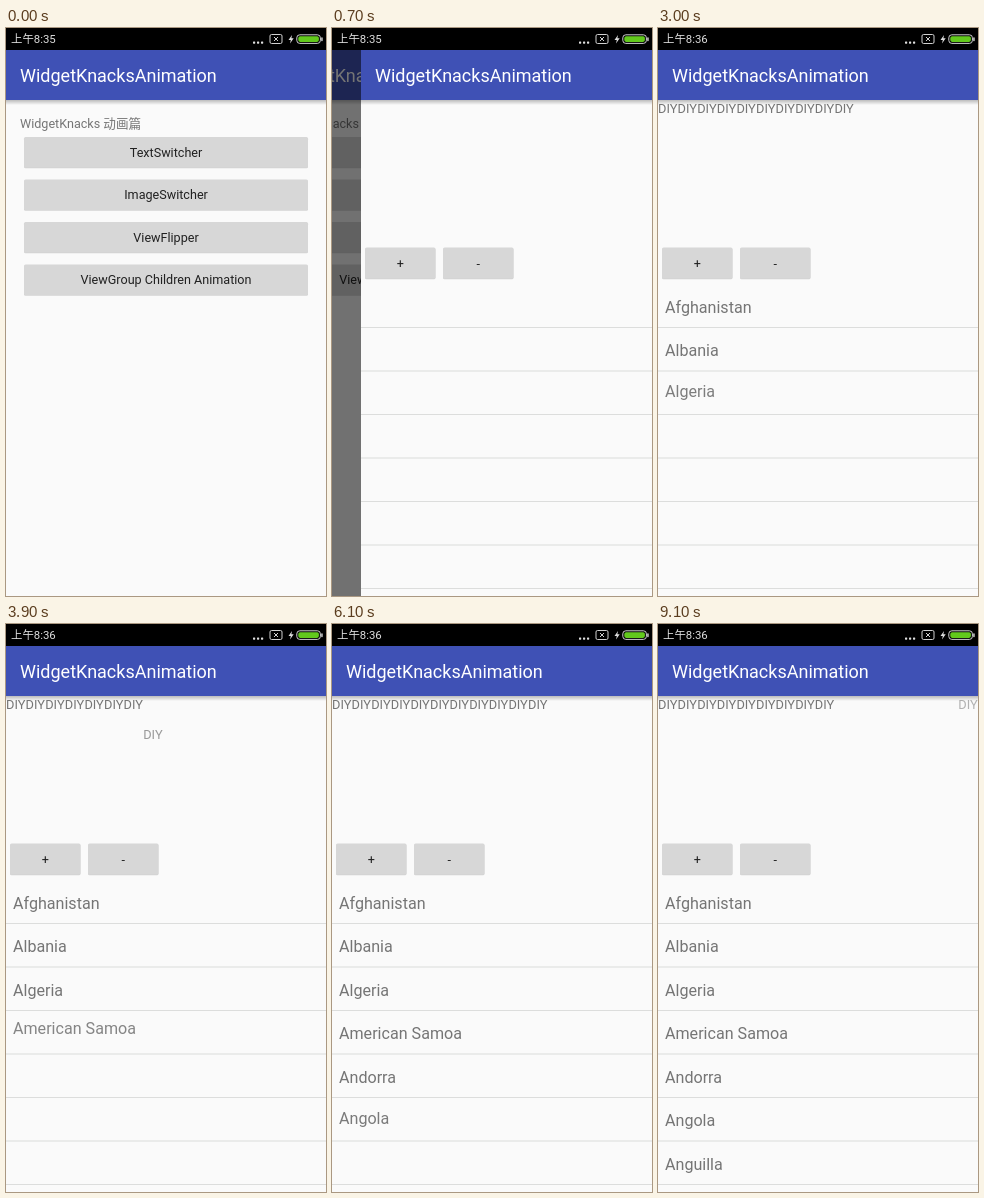
Write an HTML page with a canvas that moves like this. It is 320x568 px and loops after 9.2 s.

```html
<!DOCTYPE html>
<html lang="zh">
<head>
<meta charset="utf-8">
<title>Layout animation demo</title>
<style>
html, body { margin: 0; width: 100%; height: 100%; overflow: hidden; background: #fafafa; }
canvas { display: block; width: 320px; height: 568px; }
</style>
</head>
<body>
<canvas id="stage"></canvas>
<script>
const W = 320, H = 568, LOOP = 9200, STEP = 100;
const FONT = 'Roboto, "Noto Sans CJK SC", "Noto Sans CJK", sans-serif';
const NAME = 'WidgetKnacks';
const MENU = ['TextSwitcher', 'ImageSwitcher', 'ViewFlipper', 'ViewGroup Children Animation'];
const COUNTRIES = ['Afghanistan', 'Albania', 'Algeria', 'American Samoa',
  'Andorra', 'Angola', 'Anguilla', 'Antarctica'];
const ROW = 43.5, SLOT = 19.6;

const canvas = document.getElementById('stage');
const ctx = canvas.getContext('2d');
const dpr = window.devicePixelRatio || 1;
canvas.width = W * dpr;
canvas.height = H * dpr;

const ramp = (t, start, span) => Math.min(1, Math.max(0, (t - start) / span));
const easeOut = (p, power) => 1 - Math.pow(1 - p, power);

function box(x, y, w, h, color) {
  ctx.fillStyle = color;
  ctx.fillRect(x, y, w, h);
}

function round(x, y, w, h, r, color) {
  ctx.fillStyle = color;
  ctx.beginPath();
  ctx.roundRect(x, y, w, h, r);
  ctx.fill();
}

function text(str, x, y, size, color, align = 'left') {
  ctx.font = `${size}px ${FONT}`;
  ctx.textAlign = align;
  ctx.fillStyle = color;
  ctx.fillText(str, x, y);
}

function faded(alpha, draw) {
  ctx.save();
  ctx.globalAlpha = alpha;
  draw();
  ctx.restore();
}

function button(label, x, y, w, h) {
  round(x, y + 0.8, w, h, 1.5, 'rgba(0,0,0,.16)');
  round(x, y, w, h, 1.5, '#d7d7d7');
  text(label, x + w / 2, y + h / 2 + 4.5, 12.6, '#212121', 'center');
}

function pageBase() {
  box(0, 22, W, H - 22, '#fafafa');
  const shade = ctx.createLinearGradient(0, 72, 0, 77);
  shade.addColorStop(0, 'rgba(0,0,0,.25)');
  shade.addColorStop(1, 'rgba(0,0,0,0)');
  box(0, 72, W, 5, shade);
  box(0, 22, W, 50, '#3f51b5');
  text(NAME + 'Animation', 14, 53.8, 18, '#fff');
}

function menuPage() {
  pageBase();
  text(NAME + ' 动画篇', 14, 99.5, 12.6, '#757575');
  MENU.forEach((label, i) => button(label, 18, 109 + i * 42.5, 284, 30.5));
}

// Tags fly in from the right and drop out downwards.
const tags = [];
function addTag(slot, born, gone) { tags.push({ slot, born, gone }); }
for (let i = 0; i < 10; i++) {
  addTag(i, 1150 + i * 150, i < 4 ? (i === 3 ? 6650 : Infinity) : 3300 + (9 - i) * 260);
}
for (let i = 4; i < 11; i++) addTag(i, 4850 + (i - 4) * 130, i === 10 ? 8100 : Infinity);
addTag(10, 9050, Infinity);

// After the fourth tag leaves, the later ones close the gap one by one, last first.
function slotAt(slot, t) {
  return slot < 4 ? slot : slot - ramp(t, 7150 - (slot - 4) * 60, 100);
}

function drawTag({ slot, born, gone }, t) {
  if (t < born) return;
  const enter = ramp(t, born, 400), leave = ramp(t, gone, 300);
  if (leave >= 1) return;
  const home = slotAt(slot, t) * SLOT;
  const x = 320 + (home - 320) * enter * 1.1;
  faded(Math.min(1, enter * 4.4) * (1 - leave), () =>
    text('DIY', Math.max(home, x), 85 + leave * 113, 12.8, '#757575'));
}

function drawRow(name, i, t) {
  const p = i ? ramp(t, 85 + i * 1018, 1157) : ramp(t, 700, 700);
  if (!p) return;
  const shown = easeOut(p, 2);
  faded(shown, () => text(name, 7, 284.5 + (i - 1 + shown) * ROW, 16.1, '#757575'));
}

function groupPage(t) {
  pageBase();
  tags.forEach(tag => drawTag(tag, t));
  button('+', 4, 219.5, 70.5, 31);
  button('-', 82, 219.5, 70.5, 31);
  for (let i = 0; i < 7; i++) box(0, 299 + i * ROW, W, 1, '#dcdddc');
  COUNTRIES.forEach((name, i) => drawRow(name, i, t));
}

function statusBar(t) {
  box(0, 0, W, 22, '#000');
  text(t < 1050 ? '上午8:35' : '上午8:36', 5, 15, 11.4, '#dedede');
  for (let i = 0; i < 3; i++) round(247 + i * 4, 13.5, 2.2, 2.2, 0.6, '#dedede');

  ctx.strokeStyle = '#d0d0d0';
  ctx.lineWidth = 1;
  ctx.beginPath();
  ctx.roundRect(264, 6.5, 12, 9, 1.5);
  ctx.moveTo(268, 9);
  ctx.lineTo(272, 13);
  ctx.moveTo(272, 9);
  ctx.lineTo(268, 13);
  ctx.stroke();

  ctx.fillStyle = '#dedede';
  ctx.beginPath();
  [[286, 7], [282.5, 12], [284.8, 12], [284, 15.5], [287.7, 10.3], [285.4, 10.3]]
    .forEach(([x, y]) => ctx.lineTo(x, y));
  ctx.fill();

  ctx.beginPath();
  ctx.roundRect(290.8, 6.8, 23.6, 8.6, 3);
  ctx.stroke();
  round(292.3, 8.3, 20.6, 5.6, 1.8, '#62c91c');
  round(315.2, 9.2, 1.5, 4, 0.7, '#d0d0d0');
}

function render(t) {
  ctx.setTransform(dpr, 0, 0, dpr, 0, 0);
  const slide = easeOut(ramp(t, 400, 600), 3.46);
  const left = Math.round(W * (1 - slide));
  if (left > 0) {
    ctx.save();
    ctx.translate(-74 * slide, 0);
    menuPage();
    ctx.restore();
    box(0, 22, W, H, `rgba(0,0,0,${0.6 * slide})`);
  }
  if (slide > 0) {
    ctx.save();
    ctx.translate(left, 0);
    groupPage(t);
    ctx.restore();
  }
  statusBar(t);
}

const origin = performance.now();
function tick() {
  const t = (performance.now() - origin) % LOOP;
  render(Math.floor(t / STEP) * STEP);
  requestAnimationFrame(tick);
}
tick();
</script>
</body>
</html>
```
